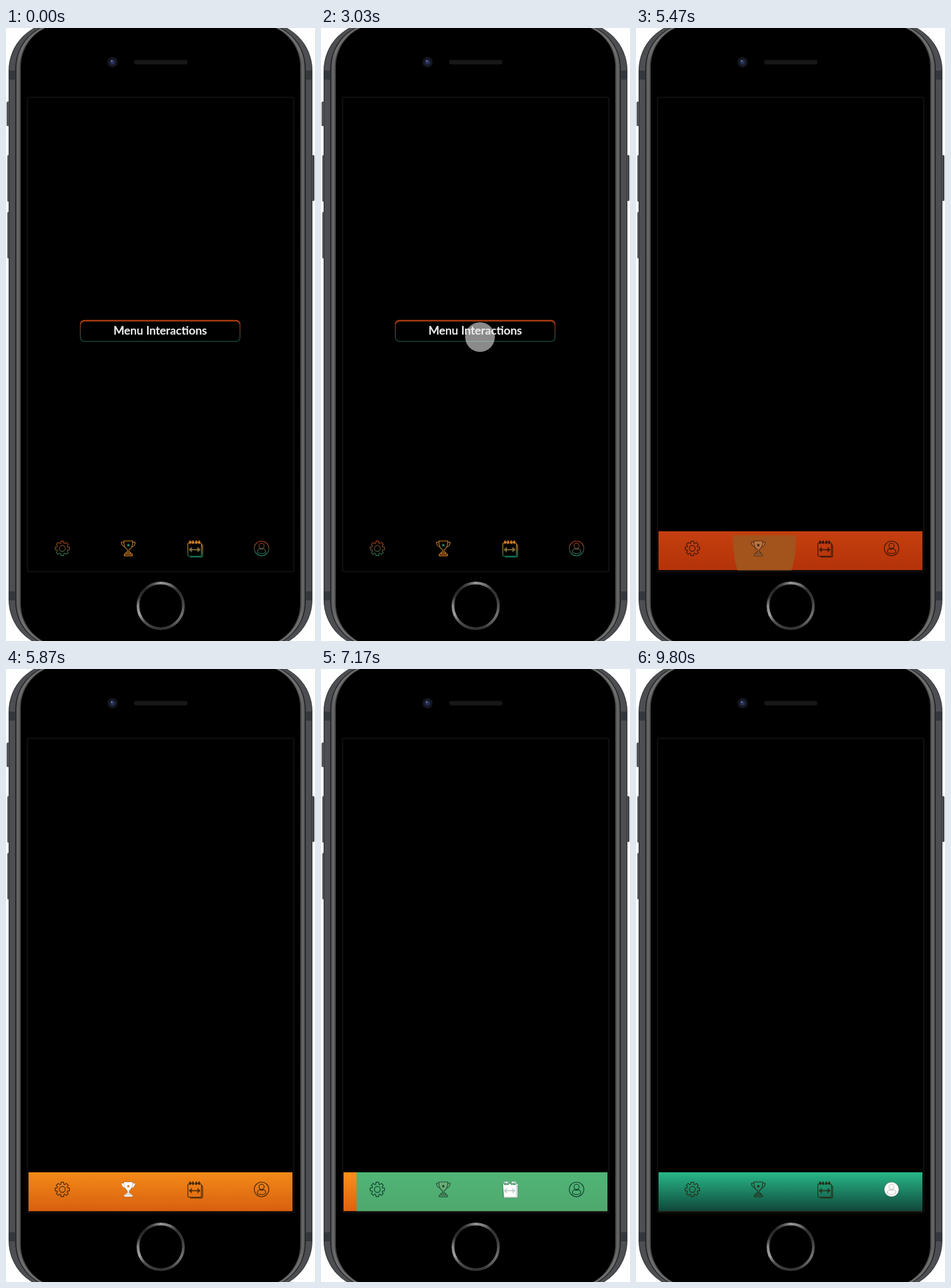
Recreate the animation shown at these times as an HTML page with a canvas. Size 480 by 950 pixels, loop 9830 ms.

```html
<!DOCTYPE html>
<html lang="en">
<head>
<meta charset="utf-8">
<title>Menu Interactions</title>
<style>
html, body { margin: 0; width: 100%; height: 100%; overflow: hidden; background: #fff; }
canvas { display: block; width: 480px; height: 950px; }
</style>
</head>
<body>
<canvas id="stage"></canvas>
<script>
const W = 480, H = 950, LOOP = 9830;
const canvas = document.getElementById('stage');
const dpr = window.devicePixelRatio || 1;
canvas.width = W * dpr;
canvas.height = H * dpr;
const ctx = canvas.getContext('2d');
ctx.scale(dpr, dpr);

const BAR = { x: 35, y: 780, w: 410, h: 60.5 };

const clamp = v => Math.max(0, Math.min(1, v));
const lerp = (a, b, p) => a + (b - a) * p;
const span = (t, a, b) => clamp((t - a) / (b - a));
const outCubic = u => 1 - (1 - u) ** 3;
const inOut = u => u < 0.5 ? 2 * u * u : 1 - 2 * (1 - u) ** 2;
const rgb = c => `rgb(${c.map(Math.round)})`;
const mix = (a, b, p) => a.map((v, i) => lerp(v, b[i], p));

function fillStops(g, colors) {
  colors.forEach((c, i) => g.addColorStop(i / (colors.length - 1), c));
  return g;
}
const gradY = (y0, y1, ...colors) => fillStops(ctx.createLinearGradient(0, y0, 0, y1), colors);
const gradX = (x0, x1, ...colors) => fillStops(ctx.createLinearGradient(x0, 0, x1, 0), colors);

function box(x, y, w, h, r, fill) {
  ctx.beginPath();
  ctx.roundRect(x, y, w, h, r);
  ctx.fillStyle = fill;
  ctx.fill();
}
function disc(x, y, r, fill) {
  ctx.beginPath();
  ctx.arc(x, y, r, 0, 7);
  ctx.fillStyle = fill;
  ctx.fill();
}

// Icons, drawn around their own centre
function gearShape() {
  const p = new Path2D();
  for (let i = 0; i < 8; i++) {
    const a = i * Math.PI / 4 - Math.PI / 2;
    [[-0.29, 8.4], [-0.19, 11.3], [0.19, 11.3], [0.29, 8.4]].forEach(([d, r]) => {
      p.lineTo(Math.cos(a + d) * r, Math.sin(a + d) * r);
    });
  }
  p.closePath();
  p.moveTo(4.6, 0);
  p.arc(0, 0, 4.6, 0, Math.PI * 2);
  return p;
}
function starShape(cx, cy, r) {
  const p = new Path2D();
  for (let i = 0; i < 10; i++) {
    const a = i * Math.PI / 5 - Math.PI / 2, q = i % 2 ? r * 0.45 : r;
    p.lineTo(cx + Math.cos(a) * q, cy + Math.sin(a) * q);
  }
  p.closePath();
  return p;
}
function dumbbell(cx, cy, half, size) {
  let d = `M${cx - half} ${cy}H${cx + half}`;
  for (const s of [-1, 1]) {
    d += `M${cx + s * half * 0.65} ${cy - size}V${cy + size}`;
    d += `M${cx + s * half * 0.9} ${cy - size * 0.5}V${cy + size * 0.5}`;
  }
  return d;
}

const icons = [
  {
    x: 87.5, y: 806.5,
    body: gearShape(),
    line: gearShape(),
    tint: ['#a83c12', '#70502a', '#17755a']
  },
  {
    x: 190, y: 806.5,
    body: new Path2D('M-7-11.5H7V-9.5H11Q10-3 5-2Q3.5 1 1.5 2V6H4V8H6.5V11.5H-6.5V8H-4V6H-1.5V2Q-3.5 1-5-2Q-10-3-11-9.5H-7Z'),
    line: new Path2D('M-7-11.5H7C7-4 4.5 0.5 1.2 2V6H-1.2V2C-4.5 0.5-7-4-7-11.5Z M-7-9.5H-10.8Q-10-3-5-2 M7-9.5H10.8Q10-3 5-2 M-3.8 6H3.8V8.3H-3.8Z M-6.3 8.7H6.3V11.3H-6.3Z'),
    star: starShape(0, -5, 2.8),
    tint: ['#d9871f', '#a8702e', '#f08a1c']
  },
  {
    x: 293.5, y: 806.5,
    body: new Path2D('M-10.5-9H10Q12-9 12-7V11Q12 13 10 13H-9Q-11-9-10.5-9Z M-9-12H-2V-7H-9Z M2-12H9V-7H2Z'),
    line: new Path2D('M-9.5-8.5H8.5Q10-8.5 10-7V10.5Q10 12 8.5 12H-9.5Q-11 12-11 10.5V-7Q-11-8.5-9.5-8.5Z M10-6Q12-6 12-4V11Q12 13.4 10 13.4H-7'),
    weights: new Path2D(dumbbell(-5.3, -9.7, 3.4, 2.4) + dumbbell(4.3, -9.7, 3.4, 2.4) + dumbbell(-0.5, 2, 8, 3.2)),
    tint: ['#e5851b', '#b5823a', '#16805f']
  },
  {
    x: 397, y: 806.5,
    body: new Path2D('M11.3 0A11.3 11.3 0 1 1-11.3 0A11.3 11.3 0 1 1 11.3 0Z'),
    line: new Path2D('M11.3 0A11.3 11.3 0 1 1-11.3 0A11.3 11.3 0 1 1 11.3 0Z M4-4A4 4 0 1 1-4-4A4 4 0 1 1 4-4Z M-6.6 5.5Q-6 0.5-2.5 0.5Q0 2 2.5 0.5Q6 0.5 6.6 5.5Q5 8 0 8Q-5 8-6.6 5.5Z'),
    tint: ['#c23f10', '#5c5038', '#178a68']
  }
];

// Each tab: start time, first ripple colour, bar gradient, ripple size and stretch
const tabs = [
  { at: 4006, first: [36, 12, 3], top: [196, 64, 16], low: [180, 50, 8], r: -3.6, tall: 1, drop: 0, ink: '#34150a' },
  { at: 5416, first: [162, 84, 28], top: [252, 144, 24], low: [222, 96, 14], r: 3.6, tall: 2, drop: 9.7, ink: '#402608' },
  { at: 6837, first: [190, 124, 26], top: [43, 200, 152], low: [40, 184, 138], r: 14.4, tall: 6, drop: 10.5, ink: '#0c3d2e' },
  { at: 8202, first: [35, 168, 124], top: [39, 184, 136], low: [16, 70, 57], r: 21.7, tall: 1, drop: 0, ink: '#292a17' }
];
const progress = (i, t) => outCubic(span(t, tabs[i].at, tabs[i].at + 800));

function phone() {
  ctx.fillStyle = '#fff';
  ctx.fillRect(0, 0, W, H);

  const key = gradX(0, 6, '#26282c', '#606265', '#303236');
  box(1, 114, 6, 38, 1.5, key);
  box(2, 197, 5, 72, 1.5, key);
  box(2, 285, 5, 72, 1.5, key);
  box(473, 197, 6, 71, 1.5, gradX(473, 479, '#303236', '#606265', '#222428'));

  box(4, -9, 472, 970, 75, '#3b3d40');
  box(5.5, -8.5, 469, 969, 74, '#4c4e51');
  ctx.fillStyle = '#34373c';
  for (const y of [66, 873]) {
    ctx.fillRect(4, y, 10, 14);
    ctx.fillRect(466, y, 10, 14);
  }
  box(14.5, -7.5, 451, 967, 70, '#1b1c1d');
  box(16, -7, 448, 966, 69,
    gradX(16, 464, '#5c5c5c', ...Array(62).fill('#6e6e6e'), '#5c5c5c'));
  box(21, -6.2, 438, 964.4, 67, '#454545');
  box(23, -6, 434, 964, 66, '#000');

  disc(165.5, 53, 8, '#15161c');
  disc(165.5, 53, 5, '#1b2038');
  disc(165.5, 53, 3, '#29355f');
  disc(164.3, 51.2, 1.1, '#8390b4');
  box(199, 49.5, 83, 7, 3.5, '#171717');

  ctx.lineWidth = 2;
  ctx.strokeStyle = '#101010';
  ctx.beginPath();
  ctx.roundRect(33.5, 107.5, 413.5, 735, 2);
  ctx.stroke();

  const ring = fillStops(ctx.createConicGradient(-Math.PI / 2, 240.3, 895.5), [
    '#999', '#777', '#333', '#333', '#505050', '#707070', '#606060', '#3a3a3a',
    '#343434', '#3c3c3c', '#505050', '#a0a0a0', '#888', '#303030', '#262626', '#444', '#999']);
  ctx.strokeStyle = ring;
  ctx.lineWidth = 4.2;
  ctx.beginPath();
  ctx.arc(240.3, 895.5, 35.3, 0, 7);
  ctx.stroke();
}

function title(t) {
  const a = 1 - span(t, 3600, 3850);
  if (!a) return;
  ctx.save();
  ctx.globalAlpha = a;
  ctx.beginPath();
  ctx.roundRect(114.8, 452.6, 249.4, 33.6, 6.5);
  ctx.roundRect(116.2, 454.8, 246.6, 30.2, 5.5);
  ctx.fillStyle = gradY(452, 487, '#bf420e', '#7a3416', '#33443a', '#14503e');
  ctx.fill('evenodd');
  ctx.fillStyle = ctx.strokeStyle = '#f6f6f6';
  ctx.lineWidth = 0.4;
  ctx.font = '500 18px Lato, "Open Sans", sans-serif';
  ctx.textAlign = 'center';
  ctx.fillText('Menu Interactions', 239.5, 475);
  ctx.strokeText('Menu Interactions', 239.5, 475);
  ctx.restore();
}

function bar(t) {
  ctx.save();
  ctx.beginPath();
  ctx.rect(BAR.x, BAR.y, BAR.w, BAR.h);
  ctx.clip();
  tabs.forEach((tab, i) => {
    const p = progress(i, t);
    if (!p) return;
    const q = clamp((p - 0.24) / 0.76);
    const rx = Math.max(0, lerp(tab.r, 240, p));
    const cx = lerp(icons[i].x, 240, p);
    const top = BAR.y + tab.drop * (1 - Math.min(1, p * 2));
    ctx.save();
    ctx.beginPath();
    ctx.rect(BAR.x, top, BAR.w, BAR.h);
    ctx.clip();
    ctx.beginPath();
    if (p > 0.97) ctx.rect(BAR.x, BAR.y, BAR.w, BAR.h);
    else ctx.ellipse(cx, tab.tall > 1 ? 790 : 804, rx, rx * tab.tall, 0, 0, 7);
    ctx.fillStyle = gradY(BAR.y, BAR.y + BAR.h, rgb(mix(tab.first, tab.top, q)), rgb(mix(tab.first, tab.low, q)));
    ctx.fill();
    ctx.restore();
  });
  ctx.restore();
}

function icon(ic, i, t) {
  const shown = progress(i, t);
  const gone = i < 3 ? progress(i + 1, t) : 0;
  const fade = i ? gone : Math.min(1, gone * 5);
  const on = Math.min(1, shown * 1.8) * (1 - fade);
  const dark = clamp((progress(0, t) - 0.2) / 0.5);
  let ink = tabs[0].ink;
  for (const tab of tabs) if (t >= tab.at + 150) ink = tab.ink;

  ctx.save();
  ctx.translate(ic.x, ic.y);
  ctx.lineJoin = ctx.lineCap = 'round';
  if (on) {
    ctx.globalAlpha = on;
    ctx.fillStyle = rgb(mix([210, 140, 70], [255, 255, 255], on));
    ctx.fill(ic.body, 'evenodd');
  }
  const outline = (style, alpha) => {
    if (alpha <= 0) return;
    ctx.globalAlpha = alpha;
    ctx.strokeStyle = style;
    ctx.lineWidth = 1.15;
    ctx.stroke(ic.line);
    if (ic.weights) {
      ctx.lineWidth = 1.4;
      ctx.stroke(ic.weights);
    }
  };
  outline(gradY(-12, 12, ...ic.tint), (1 - dark) * (1 - on));
  outline(ink, dark * (1 - on * 0.72));
  if (ic.star) {
    ctx.globalAlpha = 1;
    ctx.fillStyle = on > 0.5 ? '#d9731a' : dark > 0.5 ? ink : '#1c9a76';
    ctx.fill(ic.star);
  }
  ctx.restore();
}

function pointer(t) {
  let x, y, a = 0.59, r = 23;
  if (t >= 1400 && t < 1670) {
    x = 504 - 20 * Math.sin(Math.PI * span(t, 1400, 1670));
    y = 520;
  } else if (t >= 2620 && t < 3600) {
    const p = inOut(span(t, 2620, 3030));
    x = lerp(505, 247, p);
    y = lerp(520, 479, p);
    r -= 3 * Math.sin(Math.PI * span(t, 3300, 3500));
    a *= 1 - span(t, 3450, 3600);
  } else return;
  disc(x, y, r, `rgba(235,235,235,${a})`);
}

function frame(now) {
  const t = (now - start) % LOOP;
  phone();
  title(t);
  bar(t);
  icons.forEach((ic, i) => icon(ic, i, t));
  pointer(t);
  requestAnimationFrame(frame);
}
const start = performance.now();
requestAnimationFrame(n => frame(Math.max(n, start)));
</script>
</body>
</html>
```
